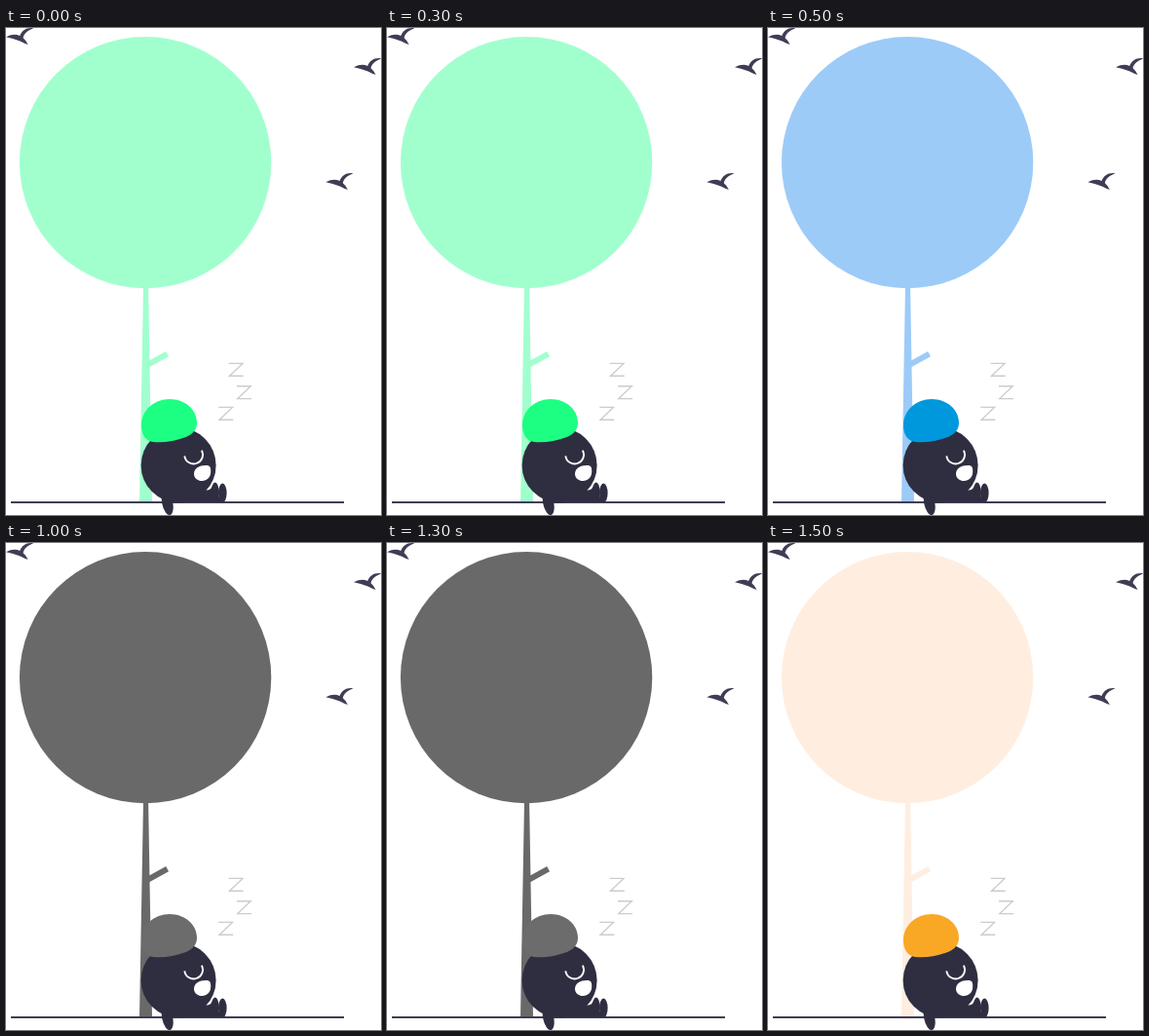
Recreate the animation shown at these times as an HTML page. Size 385 by 500 pixels, loop 2 s.

```html
<!DOCTYPE html>
<html lang="en">
<head>
<meta charset="utf-8">
<title>Nap under a tree</title>
<style>
html, body { margin: 0; width: 100%; height: 100%; overflow: hidden; background: #fff; }
svg { display: block; width: 385px; height: 500px; }
</style>
</head>
<body>
<svg viewBox="0 0 385 500">
  <defs>
    <path id="bird" d="M0 9.3Q8 5.2 14.2 8C16.5 2.5 21 -.8 28.2 .3C22 2.8 18.2 6 17.6 10.2Q20.5 12.5 22.6 17Q19 16 14.5 13.5Q9 11.2 0 9.3Z"/>
    <path id="z" d="M0 .7H14.2L.8 13.6H15"/>
  </defs>

  <g id="tree">
    <circle cx="143.1" cy="138.1" r="129.2"/>
    <path d="M141 265H146.1L147.4 341.3L164.2 332L167 337.3L147.5 347.9L150 487H137Z"/>
  </g>

  <g fill="#3f3d56">
    <use href="#bird"/>
    <use href="#bird" x="357" y="31"/>
    <use href="#bird" x="328.3" y="149"/>
    <rect x="5" y="486" width="342" height="2"/>
  </g>

  <g fill="none" stroke="#ccc" stroke-width="1.4">
    <use href="#z" x="228.7" y="343.7"/>
    <use href="#z" x="237" y="367"/>
    <use href="#z" x="218.3" y="388.7"/>
  </g>

  <g fill="#2f2e41">
    <circle cx="177.1" cy="448.9" r="38.5"/>
    <path d="M177 487L205 474.5Q210 475 212 470L222 487Z"/>
    <ellipse cx="214.7" cy="476.6" rx="3.9" ry="10"/>
    <ellipse cx="222.3" cy="477.4" rx="4.3" ry="9.9"/>
    <ellipse cx="165.7" cy="487.5" rx="5.5" ry="12.8" transform="rotate(-12 165.7 487.5)"/>
  </g>
  <path d="M183.3 439.3A9.4 9.4 0 1 0 200.9 433.6" fill="none" stroke="#fff" stroke-width="1.8"/>
  <path d="M193 457.7C193 452 199 448.6 206.5 449C209.7 449.3 210.3 452 210.2 456C210 461.5 206 465 201.3 465C196.5 465 193 462 193 457.7Z" fill="#fff"/>
  <path id="cap" d="M139 408C139 392.5 152 381 168 381C184 381 196 392 196 405.2C196 412 192 417 184 420.2C174 424 161 426.2 151 425C142.5 424 139 416 139 408Z"/>
</svg>
<script>
const LOOP = 2000;
const palettes = [
  { tree: '#a1ffce', cap: '#1cff82' },
  { tree: '#9ccbf8', cap: '#0098dc' },
  { tree: '#696969', cap: '#6c6c6c' },
  { tree: '#ffeee0', cap: '#f9a826' }
];
const tree = document.getElementById('tree');
const cap = document.getElementById('cap');

function draw(now) {
  const step = Math.floor(now % LOOP / (LOOP / palettes.length));
  tree.setAttribute('fill', palettes[step].tree);
  cap.setAttribute('fill', palettes[step].cap);
}

const start = performance.now();
function tick() {
  draw(performance.now() - start);
  requestAnimationFrame(tick);
}
tick();
</script>
</body>
</html>
```
